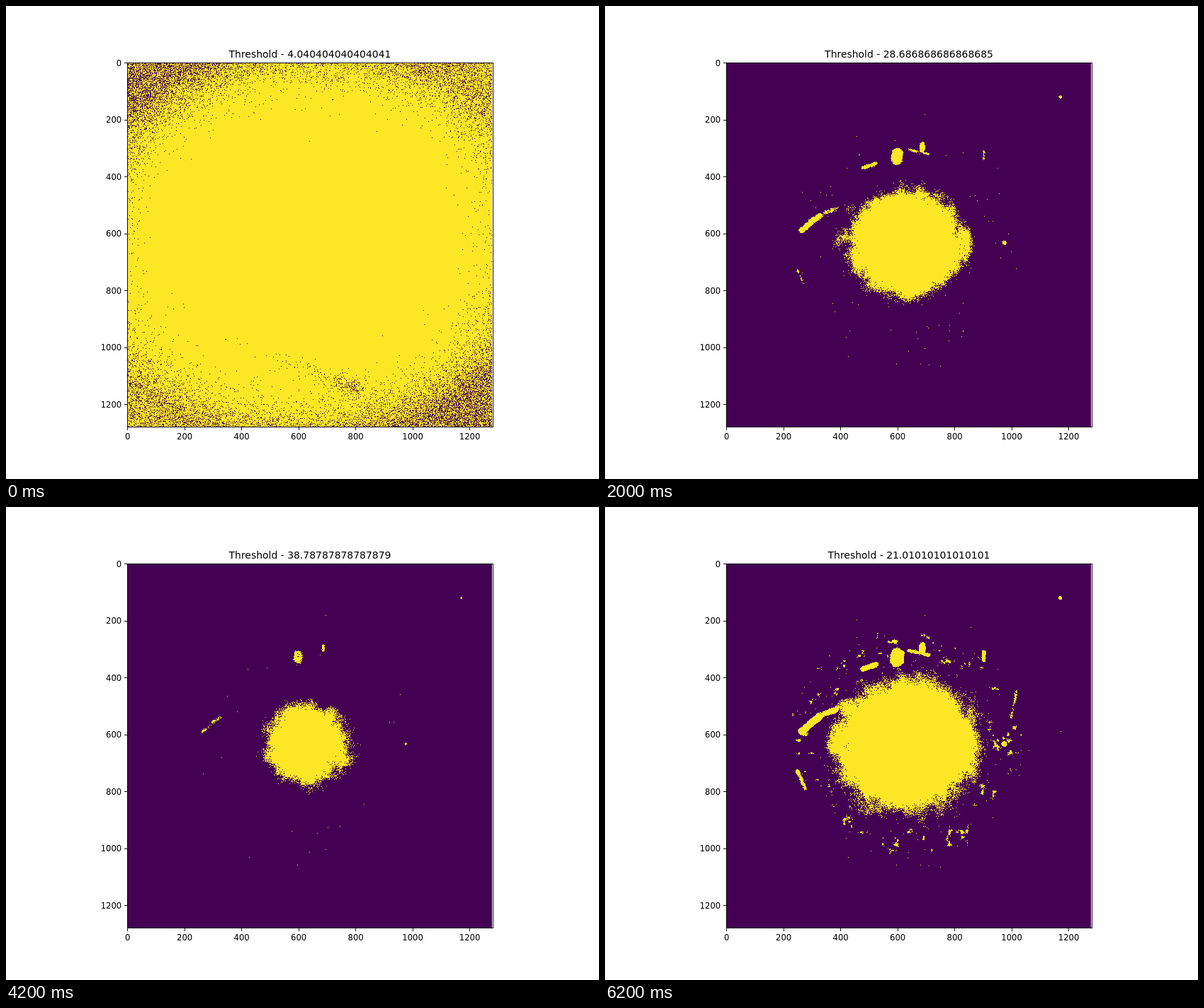
An HTML page with a canvas for the animation above (6.4 s loop, 837 by 669 pixels).

```html
<!DOCTYPE html>
<html lang="en">
<head>
<meta charset="utf-8">
<title>Threshold</title>
<style>
html, body { margin: 0; width: 100%; height: 100%; overflow: hidden; background: #fff; }
canvas { display: block; }
</style>
</head>
<body>
<canvas id="stage" width="837" height="669"></canvas>
<script>
const ctx = document.getElementById('stage').getContext('2d');
const N = 515, LEFT = 171, TOP = 80, UNIT = 1280 / N;
const FRAME_MS = 200, FRAMES = 32;

// Threshold path as [frame, step]; value = step * 40 / 99
const PATH = [[0, 10], [5, 64], [10, 71], [13, 81], [21, 96], [23, 97], [31, 52]];

// Soft bumps near the core: x, y, rx, ry, amount
const BUMPS = [
  [847, 635, 20, 65, 6], [808, 580, 10, 45, -3], [640, 815, 28, 32, 5],
  [520, 860, 80, 32, 4], [390, 620, 40, 50, 4], [420, 500, 45, 25, 5]
];

// Bright strands: x0, y0, x1, y1, width, peak
const STRANDS = [
  [601, 318, 598, 340, 18, 44], [689, 290, 688, 308, 10, 42],
  [480, 370, 525, 356, 9, 36], [640, 305, 712, 322, 7, 30],
  [265, 590, 325, 540, 11, 40], [325, 535, 388, 512, 12, 31],
  [250, 730, 278, 792, 9, 27], [903, 310, 903, 340, 8, 30],
  [1018, 450, 1000, 540, 9, 23], [975, 634, 975, 634, 8, 43],
  [1172, 121, 1172, 121, 5, 43]
];

let seed = 20417;
function rand() {
  seed = (seed + 0x6d2b79f5) | 0;
  let t = Math.imul(seed ^ (seed >>> 15), 1 | seed);
  t = (t + Math.imul(t ^ (t >>> 7), 61 | t)) ^ t;
  return ((t ^ (t >>> 14)) >>> 0) / 4294967296;
}
const gauss = () => Math.sqrt(-2 * Math.log(1 - rand())) * Math.cos(2 * Math.PI * rand());
const bell = q => Math.exp(-q * q);

function lattice(x, y) {
  let h = Math.imul(x, 374761393) + Math.imul(y, 668265263) | 0;
  h = Math.imul(h ^ (h >>> 13), 1274126177);
  return ((h ^ (h >>> 16)) >>> 0) / 2147483648 - 1;
}

// Smooth value noise in -1..1, with cells of the given size
function noise(px, py, size) {
  const x = px / size, y = py / size, i = Math.floor(x), j = Math.floor(y);
  const fade = t => t * t * (3 - 2 * t);
  const u = fade(x - i), v = fade(y - j);
  const a = lattice(i, j) * (1 - u) + lattice(i + 1, j) * u;
  const b = lattice(i, j + 1) * (1 - u) + lattice(i + 1, j + 1) * u;
  return a * (1 - v) + b * v;
}

function toSegment(x, y, x0, y0, x1, y1) {
  const dx = x1 - x0, dy = y1 - y0;
  const t = ((x - x0) * dx + (y - y0) * dy) / (dx * dx + dy * dy || 1);
  const k = Math.min(1, Math.max(0, t));
  return Math.hypot(x - x0 - k * dx, y - y0 - k * dy);
}

function brightness(x, y) {
  const dx = x - 633, dy = y - 635, r = Math.hypot(dx, dy);
  const d = Math.hypot(dx, dy * (1.03 + .17 * Math.min(1, r / 650)));

  // Core, linear halo and two brighter corners
  let v = 36 * Math.exp(-((d / 205) ** 2.4)) + Math.max(4.1, 18 - .0165 * d);
  v += Math.max(0, -dx * dy) / 330000;
  // Dust lane below the core
  v -= 3 * bell(toSegment(x, y, 350, 955, 800, 1140) / 40);

  if (r < 560) {
    const coarse = noise(x, y, 38), fine = noise(x, y, 15);
    v += (2.6 * coarse + 2 * fine) * Math.min(1, Math.max(0, (400 - r) / 150));
    // Clumpy outer ring
    const clump = noise(x, y, 23) + .6 * noise(x, y, 9) - .35;
    v += 16 * Math.max(0, clump) * bell((r - 360) / 65);
    for (const [bx, by, rx, ry, amount] of BUMPS) {
      v += amount * bell(Math.hypot((x - bx) / rx, (y - by) / ry));
    }
  }
  for (const [x0, y0, x1, y1, width, peak] of STRANDS) {
    const q = toSegment(x, y, x0, y0, x1, y1) / width;
    if (q < 2) v = Math.max(v, peak - 14 * q * q + 5 * noise(x, y, 12));
  }
  return v + gauss() * (1.5 + Math.min(v, 20) / 40);
}

const field = new Float32Array(N * N);
for (let j = 0; j < N; j++) {
  for (let i = 0; i < N; i++) field[j * N + i] = brightness((i + .5) * UNIT, (j + .5) * UNIT);
}

// Scattered single-pixel stars
for (let n = 0; n < 70; n++) {
  const angle = rand() * 2 * Math.PI, r = 110 + 35 * Math.abs(gauss());
  const i = Math.round(N / 2 + r * Math.cos(angle)), j = Math.round(N / 2 + r * Math.sin(angle));
  field[j * N + i] = Math.max(field[j * N + i], 20 + 25 * rand());
}

const image = ctx.createImageData(N, N);
const pixels = new Uint32Array(image.data.buffer);
const YELLOW = 0xff25e7fd, PURPLE = 0xff540144;

function drawAxes() {
  ctx.fillStyle = 'rgba(0, 0, 0, .93)';
  ctx.fillRect(171, 80, 517, 1);
  ctx.fillRect(171, 595, 517, 1);
  ctx.fillRect(171, 81, 1, 514);
  ctx.fillRect(687, 81, 1, 514);
  ctx.font = '11.62px "DejaVu Sans", sans-serif';
  for (let n = 0; n <= 1200; n += 200) {
    const p = n * .4025 + .2;
    ctx.fillStyle = 'rgba(0, 0, 0, .93)';
    ctx.fillRect(Math.round(171 + p), 596, 1, 4);
    ctx.fillRect(167, Math.round(80 + p), 4, 1);
    ctx.fillStyle = '#000';
    ctx.textAlign = 'center';
    ctx.fillText(n, 171.4 + p, 612.5);
    ctx.textAlign = 'right';
    ctx.fillText(n, 163.2, 84.6 + p);
  }
}

function draw(threshold) {
  ctx.fillStyle = '#fff';
  ctx.fillRect(0, 0, 837, 669);
  for (let k = 0; k < pixels.length; k++) pixels[k] = field[k] > threshold ? YELLOW : PURPLE;
  ctx.putImageData(image, LEFT, TOP);
  drawAxes();
  ctx.font = '13.95px "DejaVu Sans", sans-serif';
  ctx.textAlign = 'center';
  ctx.fillText('Threshold - ' + threshold, 429, 73.2);
}

function stepAt(frame) {
  const k = Math.max(1, PATH.findIndex(p => p[0] >= frame));
  const [f0, s0] = PATH[k - 1], [f1, s1] = PATH[k];
  return Math.round(s0 + (s1 - s0) * (frame - f0) / (f1 - f0));
}

let shown = -1;
function tick() {
  const frame = Math.floor(performance.now() / FRAME_MS) % FRAMES;
  if (frame !== shown) {
    shown = frame;
    draw(stepAt(frame) * (40 / 99));
  }
  requestAnimationFrame(tick);
}
tick();
</script>
</body>
</html>
```
